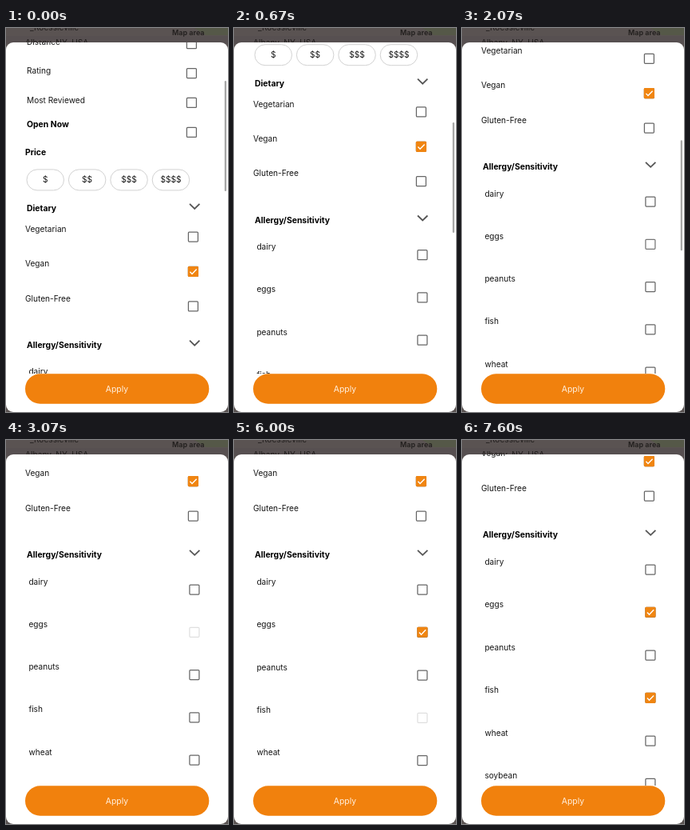
Animation of 278x480 px, one loop 8 s. Source, as an HTML page:

```html
<!DOCTYPE html>
<html lang="en">
<head>
<meta charset="utf-8">
<title>Filter sheet</title>
<style>
html, body { margin: 0; width: 100%; height: 100%; overflow: hidden; background: #5a5352; }
svg { display: block; width: 278px; height: 480px; }
text { font: 10.15px Inter, "Open Sans", sans-serif; fill: #161616; white-space: pre; }
.bold { font-weight: 700; font-size: 10.42px; fill: #000; }
.mid { text-anchor: middle; }
.light { fill: #fff0df; font-size: 10.4px; }
.dim { fill: #211e1d; }
.box { fill: #fff; stroke: #666; stroke-width: 1.25; }
.on { fill: #f08511; }
.tick { fill: none; stroke: #fff; stroke-width: 1.4; }
.chevron { fill: none; stroke: #555; stroke-width: 1.8; }
.pill { fill: #fff; stroke: #d2d2d2; stroke-width: 1; }
</style>
</head>
<body>
<svg viewBox="0 0 278 480">
  <defs><clipPath id="view"><rect y="18" width="278" height="414"/></clipPath></defs>
  <g id="backdrop">
    <rect width="278" height="480" fill="#5a5352"/>
    <path d="M236 0H278V9H250Z" fill="#555848"/>
    <rect y="10" width="278" height="10" fill="#575051"/>
    <text class="dim" x="30" y="3">_Roessleville</text>
    <text class="dim" x="208" y="9" style="font-size:9px;font-weight:600">Map area</text>
    <text class="dim" x="24" y="21.7">Albany, NY, USA</text>
  </g>
  <rect y="18" width="278" height="462" rx="9" fill="#fff"/>
  <g clip-path="url(#view)"><g id="list"></g></g>
  <rect id="bar" x="273.7" width="2.3" height="138" rx="1.15" fill="#a6a6a6"/>
  <rect x="24" y="432.2" width="230.3" height="37.6" rx="18.8" fill="#f1810d"/>
  <text class="light mid" x="139" y="454.6">Apply</text>
</svg>
<script>
const LOOP = 8000, STEP = 1000 / 15;
const list = document.getElementById('list');
const bar = document.getElementById('bar');

function add(parent, tag, attrs, content) {
  const node = document.createElementNS('http://www.w3.org/2000/svg', tag);
  for (const key in attrs) node.setAttribute(key, attrs[key]);
  if (content) node.textContent = content;
  parent.appendChild(node);
  return node;
}

const label = (parent, content, x, y, cls = '') =>
  add(parent, 'text', { x, y: y + 3.5, class: cls }, content);

function row(content, x, y, boxX, boxY, cls) {
  const group = add(list, 'g', {});
  label(group, content, x, y, cls);
  const box = add(group, 'g', { transform: `translate(${boxX} ${boxY})` });
  add(box, 'rect', { class: 'box', x: -6, y: -6, width: 12, height: 12, rx: 1 });
  const mark = add(box, 'g', { visibility: 'hidden' });
  add(mark, 'rect', { class: 'on', x: -6.6, y: -6.6, width: 13.2, height: 13.2, rx: 1.4 });
  add(mark, 'path', { class: 'tick', d: 'M-4 0.2L-1.4 2.9L4.2 -2.9' });
  return { group, box, check: on => mark.setAttribute('visibility', on ? 'visible' : 'hidden') };
}

function section(title, y) {
  label(list, title, 26, y, 'bold');
  add(list, 'path', { class: 'chevron', d: `M230 ${y - 6}l6.2 6l6.2 -6` });
}

['Distance', 'Rating', 'Most Reviewed'].forEach((name, i) =>
  row(name, 26, 17.2 + i * 36.8, 232.4, 19.8 + i * 36.9));
row('Open Now', 26, 121, 232.4, 130.6, 'bold');
label(list, 'Price', 24, 156, 'bold');
for (let i = 0; i < 4; i++) {
  const x = 26 + i * 52.4;
  add(list, 'rect', { class: 'pill', x, y: 177, width: 46.5, height: 26, rx: 13 });
  label(list, '$'.repeat(i + 1), x + 23.2, 190, 'mid');
}
section('Dietary', 226);
['Vegetarian', 'Vegan', 'Gluten-Free'].forEach((name, i) => {
  const item = row(name, 24, 251.4 + i * 43.4, 234.4, 261.2 + i * 43.4);
  item.check(name === 'Vegan');
});
section('Allergy/Sensitivity', 396.8);
const foods = ['dairy', 'eggs', 'peanuts', 'fish', 'wheat', 'soybean'].map((name, i) =>
  row(name, 28.4, 430 + i * 53.25, 235.9, 440 + i * 53.25));
const [, eggs, , fish] = foods;

// The loop opens midway through the first swipe
const FIRST_Y = -28;
const swipes = [
  { start: -270, end: 815, by: 193 },
  { start: 1790, end: 2250, by: 88 },
  { start: 6520, end: 6920, by: 25 },
];
const EGGS_ON = 4330, FISH_ON = 6400;

const ramp = (t, start, length) => Math.min(1, Math.max(0, (t - start) / length));
const ease = p => (1 - Math.cos(Math.PI * p)) / 2;
const scrollAt = t => swipes.reduce((y, s) =>
  y + s.by * ease(ramp(t, s.start, s.end - s.start)), FIRST_Y);
const barAt = t => Math.max(...swipes.map(s =>
  t < s.start ? 0 : 1 - ramp(t, s.end + 80, 200)));
// A touched box fades while held and recovers on release
const held = (t, down, up) => 0.8 * (ramp(t, down, 100) - ramp(t, up, 250));

function draw(now) {
  // The screen advances 15 times a second
  const t = Math.floor((now % LOOP + 5) / STEP) * STEP + 0.5;
  const y = scrollAt(t);
  list.setAttribute('transform', `translate(0 ${-y})`);
  bar.setAttribute('y', 66 + y / 3);
  bar.setAttribute('opacity', barAt(t));

  const eggsOn = t >= EGGS_ON, fishOn = t >= FISH_ON;
  eggs.check(eggsOn);
  fish.check(fishOn);
  eggs.box.setAttribute('opacity', 1 - held(t, 1700, 1850) - held(t, 2850, EGGS_ON + 70));
  fish.box.setAttribute('opacity', 1 - held(t, 5070, FISH_ON));

  // A ticked box makes its row slightly taller
  foods.forEach((food, i) => {
    const shift = (eggsOn && i > 1 ? 0.6 : 0) + (fishOn && i > 3 ? 0.6 : 0);
    food.group.setAttribute('transform', `translate(0 ${shift})`);
  });
}

const start = performance.now();
function tick() {
  draw(performance.now() - start);
  requestAnimationFrame(tick);
}
tick();
</script>
</body>
</html>
```
